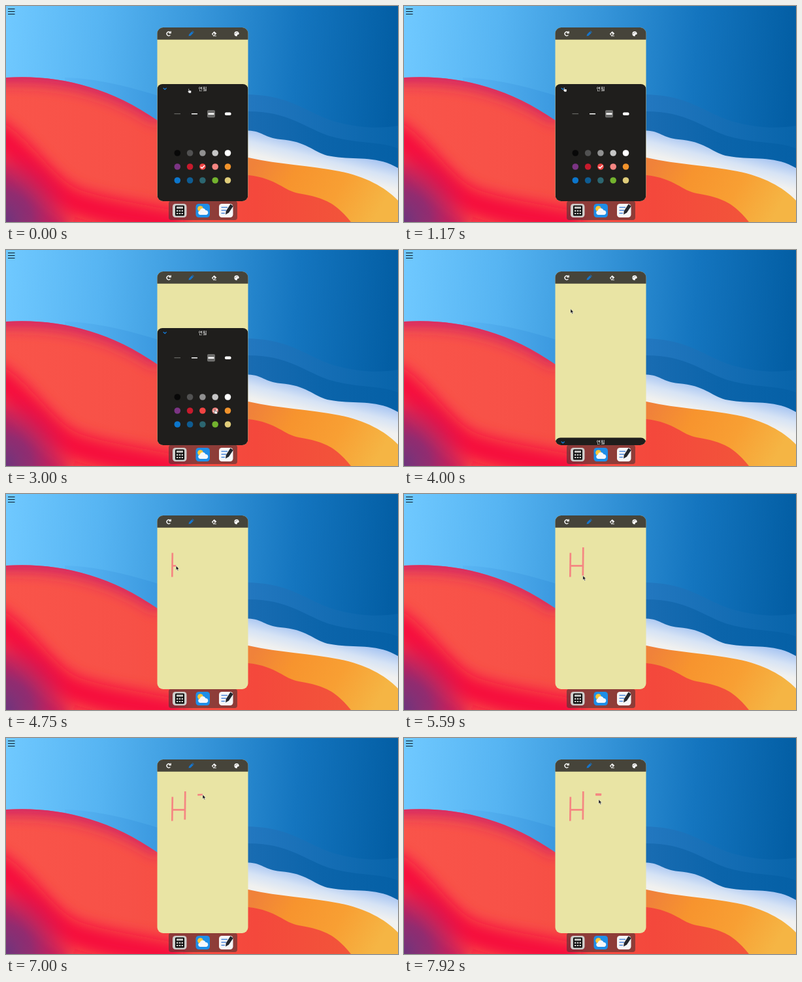
These frames come from a looping animation (600 by 332 pixels, 8 s). An HTML page:

```html
<!DOCTYPE html>
<html lang="ko">
<head>
<meta charset="utf-8">
<title>Memo</title>
<style>
html, body { margin: 0; width: 100%; height: 100%; overflow: hidden; background: #2f8cd4; }
svg { display: block; width: 100vw; height: 100vh; }
text { font: 500 7px "Noto Sans CJK KR", "Noto Sans CJK", sans-serif; fill: #fff; text-anchor: middle; }
</style>
</head>
<body>
<svg viewBox="0 0 600 332" preserveAspectRatio="none">
  <defs>
    <linearGradient id="sky" x2="1" y2=".04">
      <stop stop-color="#70c9ff"/><stop offset=".25" stop-color="#56b4f2"/>
      <stop offset=".5" stop-color="#3796da"/><stop offset=".75" stop-color="#1475bf"/>
      <stop offset="1" stop-color="#035ea4"/>
    </linearGradient>
    <linearGradient id="far" gradientUnits="userSpaceOnUse" x1="90" x2="600">
      <stop stop-color="#5ab6f4"/><stop offset=".27" stop-color="#3c9ae0"/>
      <stop offset=".56" stop-color="#2277bf"/><stop offset="1" stop-color="#0864aa"/>
    </linearGradient>
    <linearGradient id="near" gradientUnits="userSpaceOnUse" x1="370" x2="600">
      <stop stop-color="#196cb2"/><stop offset=".5" stop-color="#0b64aa"/><stop offset="1" stop-color="#0560a6"/>
    </linearGradient>
    <linearGradient id="pale" gradientUnits="userSpaceOnUse" x1="470" y1="213" x2="461" y2="249">
      <stop stop-color="#a9c6f2"/><stop offset=".5" stop-color="#d6e3f5"/><stop offset="1" stop-color="#f1f1ef"/>
    </linearGradient>
    <linearGradient id="gold" gradientUnits="userSpaceOnUse" x1="385" y1="235" x2="560" y2="335">
      <stop stop-color="#f0823a"/><stop offset=".3" stop-color="#f7942e"/>
      <stop offset=".65" stop-color="#f89f33"/><stop offset="1" stop-color="#f5b544"/>
    </linearGradient>
    <linearGradient id="red" gradientUnits="userSpaceOnUse" x2="530">
      <stop stop-color="#f9544a"/><stop offset=".35" stop-color="#f75147"/>
      <stop offset=".72" stop-color="#f4483c"/><stop offset="1" stop-color="#f2553a"/>
    </linearGradient>
    <radialGradient id="plum" gradientUnits="userSpaceOnUse" cx="-8" cy="332" r="120">
      <stop stop-color="#663580"/><stop offset=".4" stop-color="#8c2c72" stop-opacity=".9"/>
      <stop offset=".7" stop-color="#c41c5c" stop-opacity=".6"/><stop offset="1" stop-color="#f01444" stop-opacity="0"/>
    </radialGradient>
    <path id="hill" d="M0 110C75 105 155 122 232 176C285 214 320 250 371 260C415 265 425 284 448 288C490 295 505 304 528 332H0Z"/>
    <clipPath id="hillClip"><use href="#hill"/></clipPath>
    <clipPath id="phoneClip"><rect x="231.500" y="33" width="139" height="267" rx="9"/></clipPath>
    <filter id="soft" filterUnits="userSpaceOnUse" x="-80" y="40" width="520" height="380"><feGaussianBlur stdDeviation="11"/></filter>
  </defs>

  <rect width="600" height="332" fill="url(#sky)"/>
  <path fill="url(#far)" d="M90 110C150 112 200 128 240 140C290 150 330 135 371 136C440 138 460 165 505 178C545 189 575 188 600 184V332H90Z"/>
  <path fill="url(#near)" d="M232 165C290 165 330 162 371 162C430 162 455 185 490 198C535 213 570 207 600 219V332H232Z"/>
  <path fill="url(#pale)" d="M232 195C300 190 340 190 371 191.500C392 192 396 203 420 205C460 208 470 224 492 230C530 238 565 228 600 249V332H232Z"/>
  <path fill="url(#gold)" d="M232 215C300 220 340 226 371 233C420 244 465 245 510 254C550 262 580 278 600 299V332H232Z"/>
  <use href="#hill" fill="url(#red)"/>
  <g clip-path="url(#hillClip)">
    <g fill="none" filter="url(#soft)">
      <path d="M-30 104C75 98 155 112 240 168" stroke="#cf2468" stroke-width="30"/>
      <path d="M-40 185C20 205 50 280 105 302C150 318 210 326 270 338" stroke="#f6093c" stroke-width="42"/>
      <path d="M-40 245C0 260 40 330 90 350" stroke="#c41c5c" stroke-width="30"/>
    </g>
    <rect width="140" height="332" fill="url(#plum)"/>
  </g>
  <path d="M3 4.500H13.500M3 8.500H13.500M3 12.500H13.500" stroke="#0b1a26" stroke-width="1.200"/>

  <g id="dock">
    <rect x="249" y="299.500" width="105" height="29.500" rx="4" fill="#4a3434" opacity=".6"/>
    <rect x="255" y="304" width="21.500" height="21" rx="4.500" fill="#cfcdcb"/>
    <rect x="259" y="306.500" width="14" height="16" rx="1.500" fill="#111"/>
    <rect x="261" y="308.500" width="10" height="3" fill="#cfcdcb"/>
    <path d="M261 314.800H271M261 319H271" stroke="#cfcdcb" stroke-width="2.200" stroke-dasharray="2.400 1.400"/>
    <rect x="290.500" y="304" width="21.500" height="21" rx="4.500" fill="#1e8ee8"/>
    <circle cx="297.500" cy="311.500" r="4.300" fill="#fdc83c"/>
    <path fill="#f4f8fc" d="M297 321a3.200 3.200 0 0 1-.3-6.300a4.700 4.700 0 0 1 8.900-.8a3.600 3.600 0 0 1 .9 7.100Z"/>
    <rect x="326" y="304" width="21.500" height="21" rx="4.500" fill="#f6f7f8"/>
    <path d="M329.500 309.500H339M329.500 314H337M329.500 318.500H335" stroke="#4a86d8" stroke-width="1.400"/>
    <path d="M336 320.500L336.800 315L343.500 304.500L347.800 307.500L341 317.800Z" fill="#23272e"/>
  </g>

  <g clip-path="url(#phoneClip)">
    <rect x="231" y="33" width="140" height="267" fill="#e9e4a4"/>
    <rect x="231" y="33" width="140" height="18.700" fill="#46443a"/>
    <path d="M251 40.300A3 3 0 1 0 251.400 44.600M252.200 38.800V41.500H249.300" fill="none" stroke="#fff" stroke-width="1.300"/>
    <path d="M279.500 46.300L280.200 43.400L284.400 39.200L286.800 41.600L282.500 45.700ZM285 38.600L285.700 38L287.800 40.200L287.300 40.900Z" fill="#1675cc"/>
    <path d="M314.800 43L318.700 39L322.300 42.200L319 45.600H317.200Z" fill="#fff"/>
    <path d="M316.400 43.200L318 41.600L319.800 43.400L318.500 44.700H317.600Z" fill="#46443a"/>
    <path d="M317 46H322" stroke="#fff" stroke-width=".8"/>
    <path d="M353 39a3.700 3.700 0 1 0 .2 7.400c1.300-.2.300-1.500.9-2.200c.6-.7 2.500.3 2.600-1.700a3.700 3.700 0 0 0-3.700-3.500Z" fill="#fff"/>
    <g fill="#46443a"><circle cx="351" cy="42.500" r=".6"/><circle cx="352.300" cy="40.900" r=".6"/><circle cx="354.300" cy="41" r=".6"/></g>
    <g id="ink" stroke="#f58682" stroke-width="2.700"></g>
    <g id="panel">
      <rect x="231.500" y="120" width="139" height="200" rx="8" fill="#1f1e1c"/>
      <path d="M240.700 126L243.200 128.300L245.700 126" fill="none" stroke="#1279d6" stroke-width="1.300"/>
      <text x="301" y="129.700">연필</text>
      <rect x="308" y="160" width="12" height="11.500" rx="2" fill="#6c6c6a"/>
      <path d="M257.500 165.700H267" stroke="#8c8c8a" stroke-width=".8"/>
      <path d="M284 165.700H293" stroke="#fff" stroke-width="1.600"/>
      <path d="M309.500 165.700H318.500" stroke="#fff" stroke-width="2.600"/>
      <rect x="335" y="163.500" width="9.500" height="4.500" rx="1.800" fill="#fff"/>
      <g id="dots"></g>
      <path id="check" d="M-3 .2L-.8 2.300L3.300-2" fill="none" stroke="#fff" stroke-width="1.500"/>
    </g>
  </g>

  <g id="cursor">
    <path id="arrow" d="M0 0V6.600L1.500 5.300L2.500 7.700L3.700 7.200L2.700 4.900H4.700Z" fill="#111" stroke="#fff" stroke-width=".5"/>
    <path id="hand" d="M-.9-2.600Q-.3-3.300.2-2.600L.5-.2L3-.1Q3.800.2 3.700 1L3.200 3.900H.2L-1.800 1.400Q-1.800.6-.7 1Z" fill="#fff" stroke="#111" stroke-width=".5"/>
  </g>
</svg>
<script>
const LOOP = 8000, FPS = 12;
const $ = id => document.getElementById(id);
const clamp = v => Math.max(0, Math.min(1, v));
const lerp = (a, b, k) => a + (b - a) * k;
const ease = k => k * k * (3 - 2 * k);

const colX = i => 262.300 + i * 19.300;
const rowY = j => 226 + j * 21;
const palette = [
  ['#080808', '#515151', '#919191', '#c6c6c6', '#ffffff'],
  ['#7b3484', '#c71a2c', '#f04443', '#f58682', '#f2932b'],
  ['#0c76cc', '#0e5c92', '#2c6670', '#73b32e', '#e0cd7a']
];
$('dots').innerHTML = palette.map((row, j) => row.map((c, i) =>
  `<circle cx="${colX(i)}" cy="${rowY(j)}" r="4.800" fill="${c}"/>`).join('')).join('');

// start, end, x1, y1, x2, y2
const strokes = [
  [4080, 4500, 254.800, 90.500, 254.300, 127.500],
  [4660, 4920, 255, 110.300, 274, 110.300],
  [5100, 5560, 274.300, 82, 273.800, 125.500],
  [6700, 6990, 293.300, 87.400, 301, 87],
  [7080, 7250, 302, 87.400, 293.300, 86.700],
  [7250, 7500, 293.300, 86.500, 302.200, 86.500]
];
const lines = strokes.map(() =>
  $('ink').appendChild(document.createElementNS('http://www.w3.org/2000/svg', 'line')));

// time, x, y; strokes add their own stops
const stops = [
  [0, 280, 130], [200, 280, 130], [900, 245.500, 128], [1300, 245.500, 128],
  [2400, 320, 248], [3040, 320, 248], [3420, 244, 128], [3600, 244, 128],
  [3950, 255, 90.500],
  ...strokes.flatMap(([a, b, x1, y1, x2, y2]) => [[a, x1, y1], [b, x2, y2]]),
  [7750, 298, 94.500], [LOOP, 298, 94.500]
];

function cursorAt(t) {
  const i = Math.max(1, stops.findIndex(s => s[0] > t));
  const [a, b] = [stops[i - 1], stops[i]];
  const k = ease(clamp((t - a[0]) / (b[0] - a[0])));
  return [lerp(a[1], b[1], k), lerp(a[2], b[2], k)];
}

function draw(t) {
  const drop = 168.500 * ease(clamp((t - 3480) / 320));
  const hidden = t >= strokes[0][0];
  $('panel').setAttribute('transform', `translate(0 ${drop})`);
  $('panel').style.display = hidden ? 'none' : '';
  $('check').setAttribute('transform', `translate(${colX(t < 2580 ? 2 : 3)} ${rowY(1)})`);

  strokes.forEach(([a, b, x1, y1, x2, y2], i) => {
    const k = ease(clamp((t - a) / (b - a)));
    const at = { x1, y1, x2: lerp(x1, x2, k), y2: lerp(y1, y2, k) };
    for (const n in at) lines[i].setAttribute(n, at[n]);
    lines[i].style.display = k ? '' : 'none';
  });

  const [x, y] = cursorAt(t);
  const onHeader = y > 120 + drop && y < 135 + drop;
  const onDot = palette.some((row, j) => row.some((c, i) => Math.hypot(x - colX(i), y - rowY(j)) < 6));
  const hand = !hidden && (onHeader || (!drop && onDot));
  $('cursor').setAttribute('transform', `translate(${x} ${y})`);
  $('hand').style.display = hand ? '' : 'none';
  $('arrow').style.display = hand ? 'none' : '';
}

const start = performance.now();
function tick() {
  const t = (performance.now() - start) % LOOP;
  draw(Math.floor(t * FPS / 1000 + .02) * 1000 / FPS);
  requestAnimationFrame(tick);
}
tick();
</script>
</body>
</html>
```
